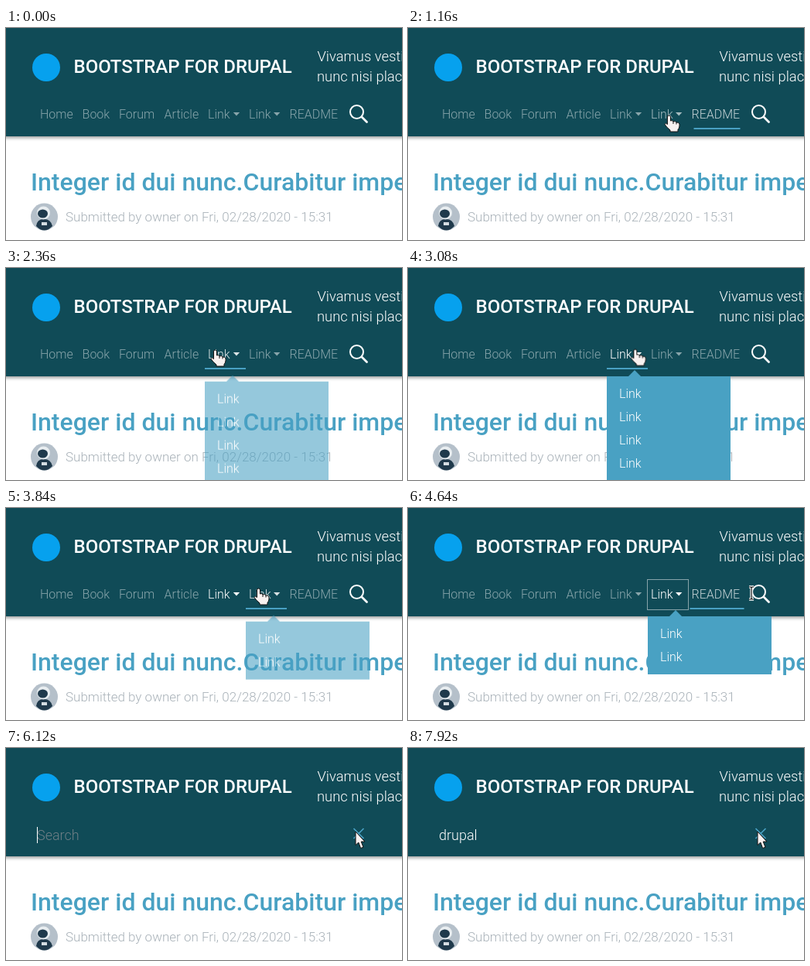
Recreate the animation shown at these times as an HTML page. Size 512x274 px, loop 8000 ms.

```html
<!DOCTYPE html>
<html lang="en">
<head>
<meta charset="utf-8">
<title>Navigation and search</title>
<style>
:root { --dark: #104b57; --blue: #49a1c3; }
html, body { margin: 0; width: 100%; height: 100%; overflow: hidden; background: #fff; }
body, svg { font: 300 16px Roboto, sans-serif; }
body { position: relative; }
svg { position: absolute; left: 0; top: 0; display: block; }
text { white-space: pre; }

/* 1% of the loop is 80 ms */
.anim { animation: 8s linear infinite both; }
.step { animation-timing-function: step-end; }
.link { fill: #fff; fill-opacity: .5; }
.line { fill: var(--blue); transform: scaleX(0); transform-box: fill-box; transform-origin: center; animation-timing-function: ease; }
.focus { fill: none; stroke: #fff; stroke-dasharray: 1 1; opacity: 0; }
.menu { fill: #fff; opacity: 0; animation-timing-function: ease; }
.menu path { fill: var(--blue); }

#nav { animation-name: nav; animation-timing-function: ease; }
#form { animation-name: form; animation-timing-function: ease; }
#link1 { animation-name: link1; }
#link2 { animation-name: link2; }
#readme { animation-name: readme; }
#line1 { animation-name: line1; }
#line2 { animation-name: line2; }
#line3 { animation-name: line3; }
#focus1 { animation-name: focus1; }
#focus2 { animation-name: focus2; }
#menu1 { animation-name: menu1; }
#menu2 { animation-name: menu2; }
#pointer { animation-name: pointer; }
#arrow { animation-name: arrow; }
#hand { animation-name: hand; }
#beam { animation-name: beam; }

@keyframes nav {
  0%, 69% { opacity: 1; transform: none; }
  74%, 100% { opacity: 0; transform: translateY(-25px); }
}
@keyframes form { 0%, 70% { opacity: 0; } 75%, 100% { opacity: 1; } }

@keyframes link1 {
  0%, 18.5% { fill-opacity: .5; }
  21%, 28.5% { fill-opacity: .75; }
  31%, 48% { fill-opacity: 1; }
  51%, 100% { fill-opacity: .5; }
}
@keyframes link2 {
  0%, 14% { fill-opacity: .5; }
  15%, 18.5% { fill-opacity: .75; }
  21%, 41% { fill-opacity: .5; }
  44%, 47% { fill-opacity: .75; }
  50%, 100% { fill-opacity: 1; }
}
@keyframes readme {
  0%, 11% { fill-opacity: .5; }
  13%, 14.5% { fill-opacity: .75; }
  17.5%, 52% { fill-opacity: .5; }
  55%, 58% { fill-opacity: .75; }
  61.5%, 100% { fill-opacity: .5; }
}
@keyframes line1 {
  0%, 18.5% { transform: scaleX(0); }
  22%, 41% { transform: none; }
  44%, 100% { transform: scaleX(0); }
}
@keyframes line2 {
  0%, 14.5% { transform: scaleX(0); }
  17.5%, 18.5% { transform: none; }
  22%, 41% { transform: scaleX(0); }
  44%, 52% { transform: none; }
  55.5%, 100% { transform: scaleX(0); }
}
@keyframes line3 {
  0%, 11% { transform: scaleX(0); }
  13.5%, 14% { transform: none; }
  17.5%, 52% { transform: scaleX(0); }
  55.5%, 57.8% { transform: none; }
  61.5%, 100% { transform: scaleX(0); }
}
@keyframes focus1 { 0% { opacity: 0; } 41% { opacity: 1; } 45%, 100% { opacity: 0; } }
@keyframes focus2 { 0% { opacity: 0; } 52% { opacity: 1; } 66.5%, 100% { opacity: 0; } }
@keyframes menu1 {
  0%, 28.5% { opacity: 0; transform: translateY(16px); }
  31.5%, 46.99% { opacity: 1; transform: none; }
  47%, 100% { opacity: 0; transform: none; }
}
@keyframes menu2 {
  0%, 47% { opacity: 0; transform: translateY(16px); }
  50%, 69% { opacity: 1; transform: none; }
  72%, 100% { opacity: 0; transform: translateY(16px); }
}

@keyframes pointer {
  0%, 4.9% { transform: translate(530px, 82px); }
  5% { transform: translate(508px, 82px); }
  11% { transform: translate(436px, 104px); }
  14% { transform: translate(363px, 112px); }
  14.5% { transform: translate(338px, 113px); }
  15.5% { transform: translate(332px, 113px); }
  18.5% { transform: translate(310px, 111px); }
  22.5%, 34% { transform: translate(271px, 106px); animation-timing-function: ease-in-out; }
  44%, 50% { transform: translate(327px, 104px); }
  57%, 58% { transform: translate(444px, 110px); }
  61.5%, 100% { transform: translate(452px, 108px); }
}
@keyframes arrow { 0% { opacity: 1; } 11% { opacity: 0; } 59.5%, 100% { opacity: 1; } }
@keyframes hand { 0% { opacity: 0; } 11% { opacity: 1; } 56.5%, 100% { opacity: 0; } }
@keyframes beam { 0% { opacity: 0; } 56.5% { opacity: 1; } 59.5%, 100% { opacity: 0; } }

#field { position: absolute; left: 40px; top: 102px; height: 21px; font-size: 18px; line-height: 22px; color: #fff; white-space: pre; }
#hint { position: absolute; left: 0; top: 0; color: #6f7f86; animation-name: hint; }
#typed { display: inline-block; height: 21px; vertical-align: top; }
#typed::before { content: ""; animation: typing 8s step-end infinite both; }
#caret { display: inline-block; width: 1px; height: 21px; vertical-align: top; background: #fff; animation-name: caret; }
@keyframes hint { 0% { opacity: 1; } 87%, 100% { opacity: 0; } }
@keyframes typing {
  0% { content: ""; }
  87% { content: "d"; }
  89% { content: "dr"; }
  92.5% { content: "dru"; }
  95.5% { content: "drup"; }
  97% { content: "drupa"; }
  98%, 100% { content: "drupal"; }
}
@keyframes caret {
  0% { opacity: 1; }
  83.5% { opacity: 0; }
  87% { opacity: 1; }
  99%, 100% { opacity: 0; }
}
</style>
</head>
<body>
<svg width="512" height="274" viewBox="0 0 512 274">
  <rect x="-10" y="-10" width="532" height="150" fill="var(--dark)" style="filter: drop-shadow(0 2px 2px rgba(0,0,0,.4))"/>
  <circle cx="52" cy="51" r="18" fill="#06a1ee"/>
  <text x="87.5" y="58" font-size="24" font-weight="500" fill="#fff">BOOTSTRAP FOR DRUPAL</text>
  <g font-size="18.4" fill="#fff">
    <text x="402.5" y="43">Vivamus vestibulum</text>
    <text x="402" y="69">nunc nisi placerat</text>
  </g>

  <text x="32" y="210" font-size="32" font-weight="500" fill="var(--blue)">Integer id dui nunc.Curabitur imperdiet</text>
  <g>
    <circle cx="49.5" cy="244" r="17.5" fill="#b5c0ca"/>
    <path d="M39 256Q40 247 49 247T60 256Q55 261.5 49.5 261.5T39 256Z" fill="#203a4c"/>
    <circle cx="48.5" cy="239" r="8.5" fill="#e8edf0"/>
    <ellipse cx="47.5" cy="240" rx="6.5" ry="5.5" fill="#203a4c"/>
    <path d="M46 251h7v4h-7z" fill="#d5dde2"/>
  </g>
  <text x="77" y="250" font-size="17" fill="#a9b2b9">Submitted by owner on Fri, 02/28/2020 - 15:31</text>

  <g id="nav" class="anim">
    <g class="link">
      <text x="44" y="117">Home</text>
      <text x="98.6" y="117">Book</text>
      <text x="146" y="117">Forum</text>
      <text x="204.6" y="117">Article</text>
    </g>
    <g id="link1" class="link anim"><text x="261" y="117">Link</text><path d="M293.8 109h8.4l-4.2 4.4z"/></g>
    <g id="link2" class="link anim"><text x="314" y="117">Link</text><path d="M346 109h8.4l-4.2 4.4z"/></g>
    <text id="readme" class="link anim" x="366.5" y="117">README</text>
    <rect id="line1" class="line anim" x="257" y="129" width="53" height="2"/>
    <rect id="line2" class="line anim" x="310" y="129" width="53" height="2"/>
    <rect id="line3" class="line anim" x="363" y="129" width="73" height="2"/>
    <rect id="focus1" class="focus anim step" x="256.5" y="92.5" width="53" height="39"/>
    <rect id="focus2" class="focus anim step" x="309.5" y="92.5" width="53" height="39"/>
    <g fill="none" stroke="#fff" stroke-width="2" stroke-linecap="round">
      <circle cx="453.5" cy="108.5" r="8.5"/>
      <path d="M460 115l6.5 6.5" stroke-width="2.8"/>
    </g>
  </g>

  <g id="menu1" class="menu anim">
    <path d="M257 140h28l8-8 8 8h116v160H257z"/>
    <text x="273" y="168">Link</text>
    <text x="273" y="198">Link</text>
    <text x="273" y="228">Link</text>
    <text x="273" y="257.5">Link</text>
  </g>
  <g id="menu2" class="menu anim">
    <path d="M310 140h28l8-8 8 8h116v75H310z"/>
    <text x="326" y="168">Link</text>
    <text x="326" y="198">Link</text>
  </g>

  <path id="form" class="anim" d="M449.5 104l13 13m0-13l-13 13" stroke="var(--blue)" stroke-width="1.7"/>

  <g id="pointer" class="anim">
    <path id="arrow" class="anim step" d="M0 0V17.5L3.8 14 6.6 21.5 10 20.2 7.2 13H12Z" fill="#f8f1f0" stroke="#111" stroke-linejoin="round"/>
    <g id="hand" class="anim step" stroke="#111" stroke-linejoin="round">
      <path d="M-2.5 2Q-2.5 0-.5 0T1.5 2V7Q4 5.8 5 8Q7.8 6.8 9 9Q12.3 8.5 13 11V14Q12.5 17 11 18.5V21H1V19Q-4 15-6 11.5Q-5 9-2.5 11.5Z" fill="#f8f1f0"/>
      <path d="M5 8v3M9 9v2.5" fill="none"/>
    </g>
    <g id="beam" class="anim step" fill="none">
      <path id="bar" d="M-3-8H-1L0-7 1-8H3M0-7V7M-3 8H-1L0 7 1 8H3" stroke="#fff" stroke-width="3"/>
      <use href="#bar" style="stroke: #111"/>
      <path d="M-3-8H-1L0-7 1-8H3M0-7V7M-3 8H-1L0 7 1 8H3" stroke="#111" stroke-width="1.2"/>
    </g>
  </g>
</svg>
<div id="form-field" class="anim" style="animation-name: form; animation-timing-function: ease">
  <div id="field"><span id="hint" class="anim step">Search</span><span id="typed"></span><span id="caret" class="anim step"></span></div>
</div>
</body>
</html>
```
